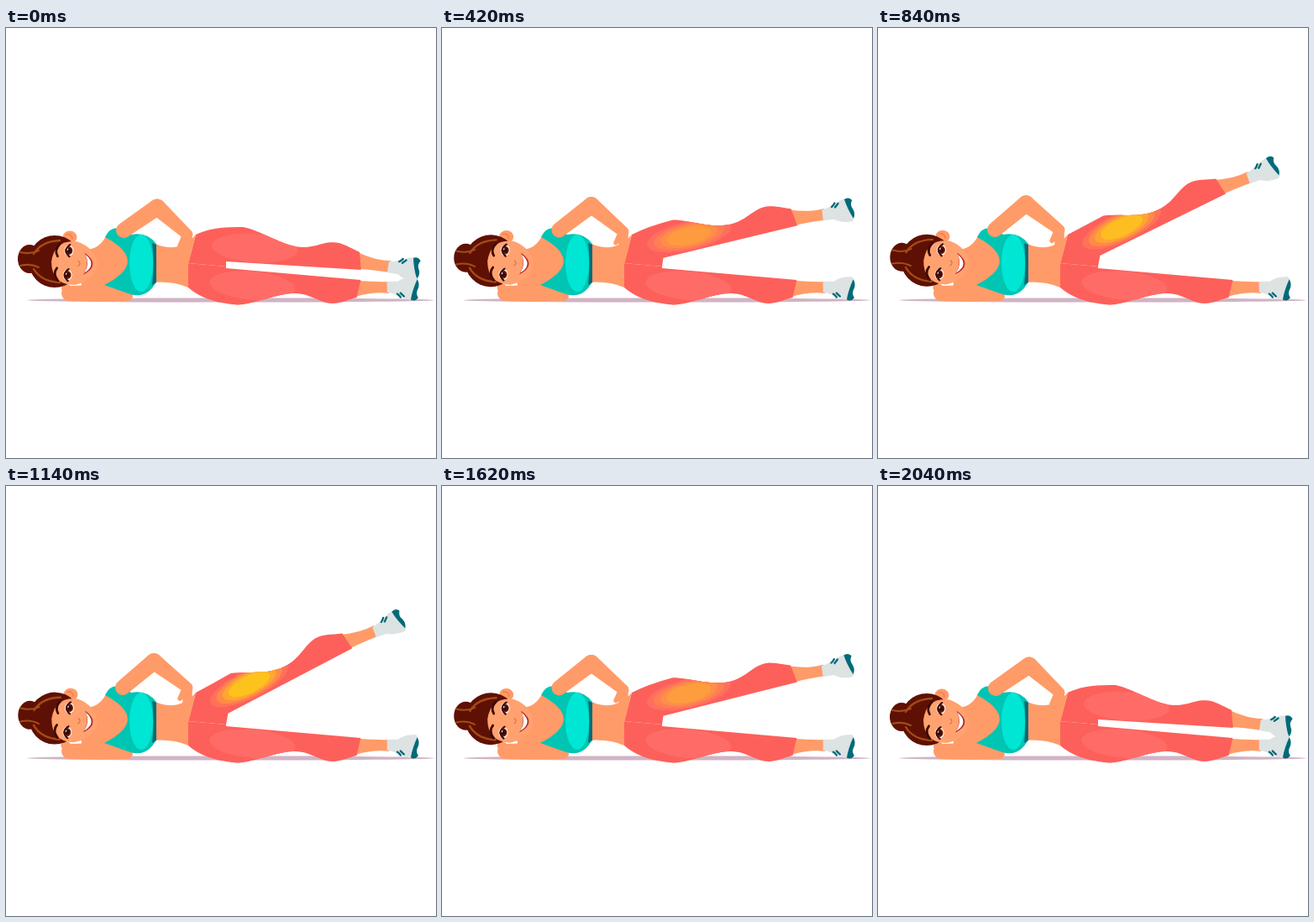
These frames come from a looping animation (512x512 px, 2.25 s). An HTML page with a canvas:

```html
<!DOCTYPE html>
<html lang="en">
<head>
<meta charset="utf-8">
<title>Side leg raise</title>
<style>
html, body { margin: 0; width: 100%; height: 100%; overflow: hidden; background: #fff; }
canvas { display: block; width: 100vw; height: 100vh; object-fit: contain; }
</style>
</head>
<body>
<canvas id="stage" width="512" height="512"></canvas>
<script>
const ctx = document.getElementById('stage').getContext('2d');
const LOOP = 2250, STEP = 30, MOVE = 930, DOWN = 1110, LIFT = -30.5;
const SKIN = '#ff9b68', PANTS = '#fd605a', HAIR = '#5f1004', STREAK = '#a34c14',
      TEAL = '#00c5b3', MINT = '#00e6d4', DARK = '#006a78', SHOE = '#dde2e3', LASH = '#3d0a05';
const GLOW = [255, 108, 103], CORAL = [255, 113, 88], YELLOW = [254, 196, 28];
const HIP = { x: 240, y: 260 }, CUFF = 161;

const mix = (a, b, k) => a + (b - a) * k;
const blend = (a, b, k) => a.map((v, i) => mix(v, b[i], k));
const rgb = c => `rgb(${c.map(Math.round).join()})`;
const clamp = v => Math.max(0, Math.min(1, v));
const bump = (x, mid, width) => Math.exp(-(((x - mid) / width) ** 2));

// Closed outline: [x, y] is a line, [cx, cy, x, y] a curve.
function path(fill, first, ...rest) {
  ctx.beginPath();
  ctx.moveTo(...first);
  for (const p of rest) p.length > 2 ? ctx.quadraticCurveTo(...p) : ctx.lineTo(...p);
  ctx.fillStyle = fill;
  ctx.fill();
}

function oval(x, y, rx, ry, fill) {
  ctx.beginPath();
  ctx.ellipse(x, y, rx, ry, 0, 0, 7);
  ctx.fillStyle = fill;
  ctx.fill();
}

function stroke(width, color, from, ...curve) {
  ctx.beginPath();
  ctx.moveTo(...from);
  ctx.quadraticCurveTo(...curve);
  ctx.lineWidth = width;
  ctx.lineCap = 'round';
  ctx.strokeStyle = color;
  ctx.stroke();
}

// Chain of tapered capsules through joints [x, y, radius].
function limb(fill, ...joints) {
  ctx.fillStyle = fill;
  for (let i = 1; i < joints.length; i++) {
    const [x, y, r] = joints[i - 1], [p, q, w] = joints[i];
    const a = Math.atan2(q - y, p - x), side = Math.PI / 2;
    ctx.beginPath();
    ctx.arc(x, y, r, a + side, a - side);
    ctx.arc(p, q, w, a - side, a + side);
    ctx.fill();
  }
}

function around(x, y, angle, draw) {
  ctx.save();
  ctx.translate(x, y);
  ctx.rotate(angle);
  draw();
  ctx.restore();
}

function raise(t) {
  const u = clamp((t < DOWN ? t : t - DOWN) / MOVE), bow = u * (1 - u);
  return t < DOWN ? u + 0.35 * bow : 1 - u + 0.43 * bow;
}

function shoe() {
  path(SHOE, [0, -7], [13, -7], [22, -13, 35, -12], [40, -5, 35, 4], [34, 8, 37, 13],
    [30, 18, 20, 13], [8, 7, 0, 6]);
  path(DARK, [36, -9], [40, -3, 36, 4], [34, 8, 37, 13], [33, 18, 28, 15], [30, 4, 36, -9]);
  for (const i of [0, 1]) stroke(2.3, DARK, [12 + 4 * i, 8 - i], 14 + 4 * i, 9, 16 + 4 * i, 12 - i);
}

// Thigh and calf are two bumps on a straight inner seam; the thigh slims when raised.
const girth = (u, s) => 17 + 26 * bump(u, 8, 58) + 13.5 * bump(u, 128, 28) - 9.5 * s * bump(u, 55, 45);

// The frame m runs along the inner seam from the crotch, with y pointing outward.
function leg(m, waist, hip, s) {
  const at = (u, v) => {
    const p = m.transformPoint({ x: u, y: v });
    return [p.x, p.y];
  };
  ctx.save();
  ctx.setTransform(m);
  path(SKIN, [155, 1], [178, 1, 196, -1], [196, 13], [178, 12, 155, 21]);
  around(193, 6, -0.1, shoe);
  ctx.restore();

  const outer = [];
  for (let u = 18; u <= CUFF; u += 4) outer.push(at(u, girth(u, s)));
  path(PANTS, [262, 284], [217, 280], waist, [...hip, ...outer[0]], ...outer,
    at(CUFF, 0), at(-6 * s, -4 * s));

  ctx.save();
  ctx.clip();
  ctx.setTransform(m);
  for (let k = 0; k < 4; k++) {
    const hot = blend(CORAL, YELLOW, k / 3);
    oval(33 - s, 18 - 2 * s, 51 - 8 * k, 17 - 2.2 * k, rgb(blend(GLOW, hot, s)));
  }
  ctx.restore();
}

function legs(s) {
  const top = new DOMMatrix().translate(HIP.x, HIP.y).rotate(LIFT * s)
    .translate(262 - HIP.x, 278 - HIP.y).rotate(3.6).scale(1, -1);
  const bottom = new DOMMatrix().translate(262, 286).rotate(5);
  leg(top, [226, 246], [245, 236], s);
  leg(bottom, [217, 309], [237, 327], 0);
}

function torso() {
  path(SKIN, [88, 262], [108, 268, 119, 248], [150, 250], [150, 310], [90, 312]);
  path(SKIN, [174, 255], [204, 271, 226, 246], [217, 282], [217, 309], [198, 301, 174, 303]);
  limb(SKIN, [75, 316, 9], [110, 316, 10], [145, 319, 6]);
  path(TEAL, [118, 249], [127, 229, 149, 246], [168, 242, 179, 257], [179, 302],
    [168, 323, 148, 317], [117, 306], [172, 278, 118, 249]);
  oval(161, 280, 14, 34, MINT);
  path(DARK, [174, 256], [179, 258], [179, 303], [174, 306], [177, 280, 174, 256]);
}

function arm(s) {
  const wrist = [216, 246 - 6 * s];
  limb(SKIN, [140 - s, 241 - s, 9], [180 - 4 * s, 213.5 - 4.5 * s, 10], [...wrist, 6.5]);
  for (let i = 0; i < 3; i++)
    limb(SKIN, [...wrist, 6], [207 + 6 * i, wrist[1] + 13 + 4 * Math.sin(i * 1.5), 2.7]);
}

// Features mirror about the middle of the face, with the crown to the left.
function face() {
  path('#ffa26f', [-27, 0], [-25, -27, 2, -26], [24, -20, 28, 0], [24, 20, 2, 26], [-25, 27, -27, 0]);
  for (const d of [-1, 1]) {
    const y = 14.5 * d;
    stroke(2.8, LASH, [-20, 7 * d], -25, 14 * d, -18, 22 * d);
    oval(-7, y, 5.5, 6.5, '#fff');
    oval(-7, y, 4.5, 5, '#7b260d');
    oval(-6.5, y, 2.8, 3.2, LASH);
    oval(-9, y - 1.5, 1.2, 1.3, '#fff');
    stroke(2.2, LASH, [-6, y - 7], -15, y, -6, y + 7);
  }
  stroke(1.2, '#e36f43', [5, -3], 9, 0, 5, 3);
  path('#b92d2d', [12, -13], [33, 0, 12, 13], [19, 0, 12, -13]);
  path('#fff', [13, -11], [28, 0, 13, 11], [19, 0, 13, -11]);
}

function head() {
  oval(76, 249, 8.5, 7.5, SKIN);
  stroke(1.3, '#ed7b4c', [72, 246], 78, 244, 79, 251);
  oval(72, 310, 6, 5, SKIN);
  oval(28, 275, 14, 17, HAIR);
  oval(58, 278, 31, 31, HAIR);
  for (const d of [-1, 1]) {
    stroke(2, STREAK, [17, 275 + 8 * d], 29, 275 + 5 * d, 39, 275 + 10 * d);
    stroke(2.4, STREAK, [33, 278 + 9 * d], 42, 278 + 24 * d, 64, 278 + 25 * d);
  }
  around(81, 280, 0.06, face);
}

function draw(s) {
  ctx.fillStyle = '#fff';
  ctx.fillRect(0, 0, 512, 512);
  oval(267.5, 324, 242.5, 2.6, '#d0b3c4');
  legs(s);
  torso();
  arm(s);
  around(105, 285, 0.03 * s, () => {
    ctx.translate(-105, -285);
    head();
  });
}

const start = performance.now();
function tick() {
  const t = (performance.now() - start) % LOOP;
  draw(raise(Math.floor(t / STEP) * STEP));
  requestAnimationFrame(tick);
}
tick();
</script>
</body>
</html>
```
